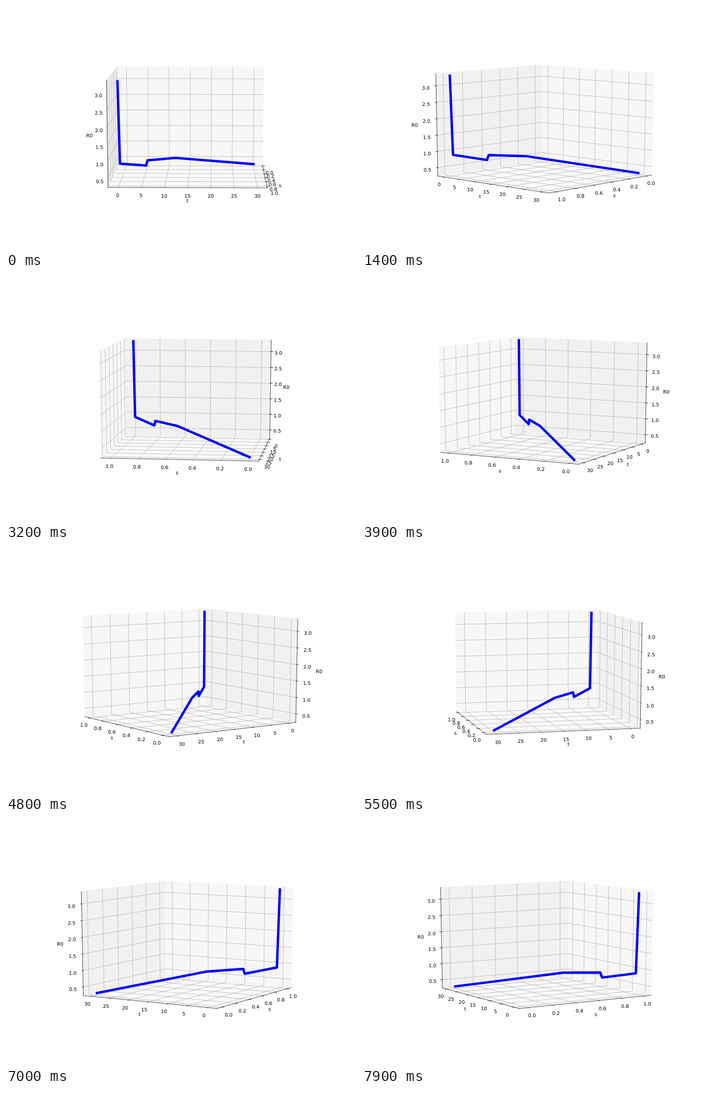
Recreate the animation shown at these times as an HTML page. Size 600 by 420 pixels, loop 8000 ms.

```html
<!DOCTYPE html>
<html lang="en">
<head>
<meta charset="utf-8">
<title>Rotating 3D line plot</title>
<style>
  html, body { margin: 0; width: 600px; height: 420px; overflow: hidden; background: #fefefe; }
  svg { display: block; }
  path { fill: none; }
  text { font: 8.333px "DejaVu Sans", sans-serif; text-anchor: middle; text-rendering: geometricPrecision; }
  .grid { stroke: #b0b0b0; stroke-width: .667; stroke-linejoin: round; }
  .axis { stroke: #000; stroke-width: .625; stroke-linecap: square; }
  .tick { stroke: #000; stroke-width: .667; }
  .curve { stroke: #00f; stroke-width: 4.17; stroke-linejoin: round; stroke-linecap: square; }
</style>
</head>
<body>
<svg id="plot" width="600" height="420" viewBox="0 0 600 420"></svg>
<script>
const STEP_MS = 100, STEPS = 80, START_DEG = 1, STEP_DEG = 3;
const ELEV = 10 * Math.PI / 180, DIST = 10;
const CENTER = [313.78, 204.66], SCALE = [2513.5, 1714.05];
const EDGE = .5 + 1 / 48;      // half size of the padded box
const DELTA = 1 / 12;          // unit for ticks and label offsets
const TICK_PAD = .5881 * DELTA, NAME_PAD = 1.2786 * DELTA;

// Box coordinates are ordered s, t, R0; tickDir is the axis along which ticks point.
const axes = [
  { name: 's', min: -.05, max: 1.05, first: 0, step: .2, count: 6, digits: 1, flip: 1, tickDir: 1, pane: '242,242,242,.5' },
  { name: 't', min: -1.5, max: 31.5, first: 0, step: 5, count: 7, digits: 0, flip: 0, tickDir: 0, pane: '230,230,230,.5' },
  { name: 'R0', min: .3, max: 3.3, first: .5, step: .5, count: 6, digits: 1, flip: 0, tickDir: 0, pane: '236,236,236,.3' }
];

const curve = [
  [1, 0, 3.3], [.99, .3, .891], [.81, 5.7, .729],
  [.8, 6, .88], [.6, 12, .84], [0, 30, .3]
].map(p => p.map((v, i) => unit(axes[i], v)));

const svg = document.getElementById('plot');

function add(tag, cls) {
  const el = document.createElementNS('http://www.w3.org/2000/svg', tag);
  if (cls) el.setAttribute('class', cls);
  return svg.appendChild(el);
}

function unit(axis, v) {
  return (v - axis.min) / (axis.max - axis.min) - .5;
}

function withAt(p, i, v) {
  const q = p.slice();
  q[i] = v;
  return q;
}

for (const a of axes) {
  a.paneEl = add('path');
  a.paneEl.style.fill = a.paneEl.style.stroke = `rgba(${a.pane})`;
  a.paneEl.style.strokeWidth = .833;
}
for (const a of axes) {
  a.lineEl = add('path', 'axis');
  a.nameEl = add('text');
  a.nameEl.textContent = a.name;
  a.gridEl = add('path', 'grid');
  a.tickEl = add('path', 'tick');
  a.ticks = Array.from({ length: a.count }, (_, k) => {
    const v = a.first + k * a.step, el = add('text');
    el.textContent = v.toFixed(a.digits);
    return { at: unit(a, v), el };
  });
}
const curveEl = add('path', 'curve');

function camera(azim) {
  const c = Math.cos(azim), s = Math.sin(azim), ce = Math.cos(ELEV), se = Math.sin(ELEV);
  return ([x, y, z]) => {
    const near = c * x + s * y;
    const depth = DIST - ce * near - se * z;
    return [
      CENTER[0] + SCALE[0] * (c * y - s * x) / depth,
      CENTER[1] - SCALE[1] * (ce * z - se * near) / depth
    ];
  };
}

function draw(azim) {
  const project = camera(azim);
  const path = pts => 'M' + pts.map(p => project(p).map(n => n.toFixed(2)).join(' ')).join('L');
  const back = [-Math.sign(Math.cos(azim)) * EDGE, -Math.sign(Math.sin(azim)) * EDGE, -EDGE];

  const place = (el, p, i, pad, drop) => {
    const [x, y] = project(p.map((v, j) => j === i ? v : v + Math.sign(v) * pad));
    el.setAttribute('x', x.toFixed(2));
    el.setAttribute('y', (y + drop).toFixed(2));
  };

  axes.forEach((a, i) => {
    const j = (i + 1) % 3, k = (i + 2) % 3;
    const corner = (u, v) => withAt(withAt(back, j, u * EDGE), k, v * EDGE);
    a.paneEl.setAttribute('d', path([corner(-1, -1), corner(1, -1), corner(1, 1), corner(-1, 1)]) + 'Z');

    const edge = withAt(back, a.flip, -back[a.flip]);
    a.lineEl.setAttribute('d', path([edge, withAt(edge, i, -edge[i])]));
    place(a.nameEl, withAt(edge, i, 0), i, NAME_PAD, 2.2);

    const dir = Math.sign(edge[a.tickDir]) * DELTA;
    let grid = '', marks = '';
    for (const tick of a.ticks) {
      const g = withAt(back, i, tick.at), p = withAt(edge, i, tick.at);
      grid += path([withAt(g, j, -g[j]), g, withAt(g, k, -g[k])]);
      marks += path([-.1, .2].map(f => withAt(p, a.tickDir, p[a.tickDir] + f * dir)));
      place(tick.el, p, i, TICK_PAD, 6.33);
    }
    a.gridEl.setAttribute('d', grid);
    a.tickEl.setAttribute('d', marks);
  });
  curveEl.setAttribute('d', path(curve));
}

const start = performance.now();
let shown = -1;

function frame() {
  const step = Math.floor((performance.now() - start) / STEP_MS) % STEPS;
  if (step !== shown) {
    shown = step;
    draw((START_DEG + STEP_DEG * step) * Math.PI / 180);
  }
  requestAnimationFrame(frame);
}
frame();
</script>
</body>
</html>
```
